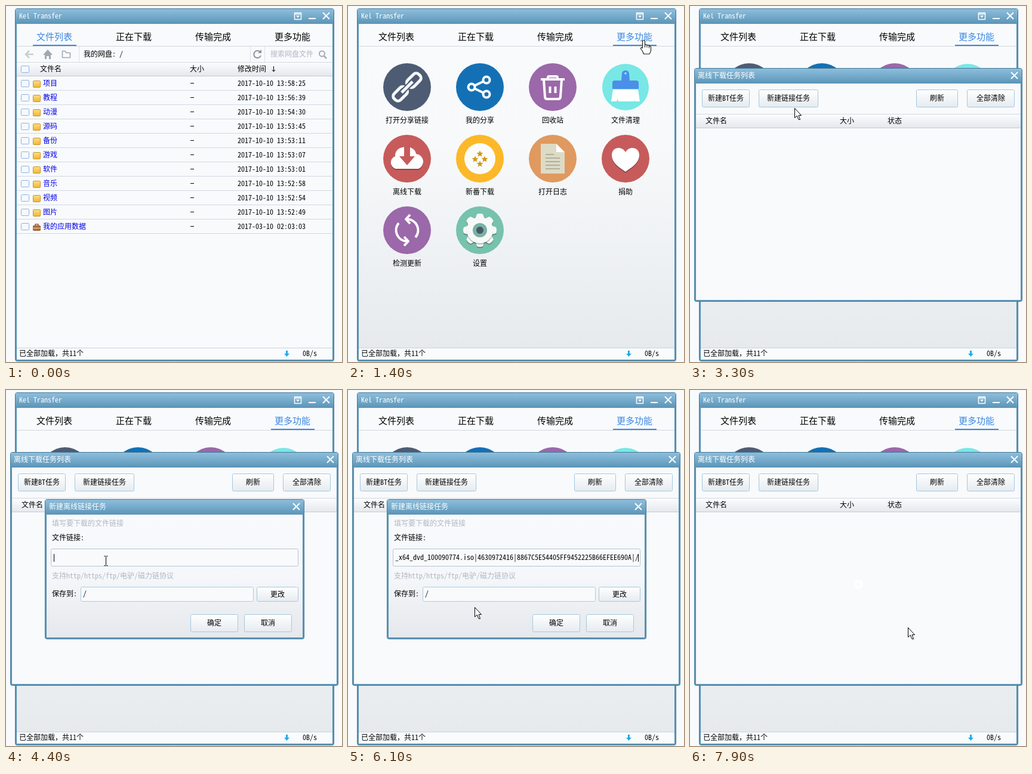
Animation, 563 px wide and 597 px high, one loop 8 s. Source, as an HTML page with a canvas:

```html
<!DOCTYPE html>
<html lang="zh-CN">
<head>
<meta charset="utf-8">
<title>Kel Transfer</title>
<style>
html, body { margin: 0; width: 100%; height: 100%; overflow: hidden; background: #f8fafc; }
canvas { display: block; }
</style>
</head>
<body>
<canvas id="stage" width="563" height="597"></canvas>
<script>
const c = document.getElementById('stage').getContext('2d');
const FONT = '"Noto Sans Mono CJK SC", "Noto Sans CJK SC", "Noto Sans CJK JP", monospace';
const BLUE = '#3b87e0', RED = '#c75b5b', PURPLE = '#9b68a9', PAPER = '#f8fafc', LINE = '#d3d9df';

// --- drawing helpers ---
function rect(x, y, w, h, fill) { c.fillStyle = fill; c.fillRect(x, y, w, h); }
function text(s, x, y, color = '#000', size = 12, align = 'left') {
  c.font = `${size}px ${FONT}`;
  c.textAlign = align;
  c.fillStyle = color;
  c.fillText(s, x, y + Math.round(size * .36));
}
function fade(y0, y1, ...colors) {
  const g = c.createLinearGradient(0, y0, 0, y1);
  colors.forEach((color, i) => g.addColorStop(i / (colors.length - 1), color));
  return g;
}
function path(d, fill, stroke, width = 1) {
  const p = new Path2D(d);
  if (fill) { c.fillStyle = fill; c.fill(p); }
  if (stroke) { c.strokeStyle = stroke; c.lineWidth = width; c.stroke(p); }
}
function disc(x, y, r, fill, stroke, width) {
  path(`M${x - r} ${y}a${r} ${r} 0 1 0 ${2 * r} 0a${r} ${r} 0 1 0 ${-2 * r} 0Z`, fill, stroke, width);
}
function box(x, y, w, h, fill, stroke, r = 2) {
  c.beginPath();
  c.roundRect(x + .5, y + .5, w - 1, h - 1, r);
  c.fillStyle = fill; c.fill();
  c.strokeStyle = stroke; c.lineWidth = 1; c.stroke();
}
function at(x, y, draw, angle = 0) {
  c.save();
  c.translate(x, y);
  c.rotate(angle);
  draw();
  c.restore();
}
function shadow(draw) {
  c.save();
  c.shadowColor = '#0004';
  c.shadowOffsetY = 2;
  draw();
  c.restore();
}

// --- widgets ---
function frame(x, y, w, h, title, titleX, body) {
  box(x, y, w, h, '#6ca2c2', '#3f7796', 3);
  rect(x + 1, y + 1, w - 2, 25, fade(y, y + 26, '#90bfdc', '#76abcb', '#5a94b7'));
  rect(x + 2, y + 26, w - 4, h - 28, '#4d89ab');
  rect(x + 3, y + 26, w - 6, h - 29, body);
  text(title, titleX, y + 13, '#fff');
  path(`M${x + w - 19} ${y + 7}l11 11m0-11l-11 11`, null, '#fff', 2);
}
function button(label, x, y, w, h, hot) {
  box(x, y, w, h, fade(y, y + h, '#fff', hot ? '#d4e8f6' : '#e5ebf0'), hot ? '#6fa9d0' : '#a6c8dd');
  text(label, x + w / 2, y + h / 2, '#000', 12, 'center');
}
function checkbox(x, y) { box(x, y, 14, 12, '#f5f9fd', '#8db4e2', 1); }
function listHeader(x, y, w, h) {
  rect(x, y, w, h, fade(y, y + h, '#fbfcfe', '#e4e7ed'));
  rect(x, y + h - 1, w, 1, '#c4cbd3');
}
const inside = (p, x, y, w, h) => p.x >= x && p.x < x + w && p.y >= y && p.y < y + h;

// --- file list ---
const files = [['项目', '58:25'], ['教程', '56:39'], ['动漫', '54:30'], ['源码', '53:45'], ['备份', '53:11'],
  ['游戏', '53:07'], ['软件', '53:01'], ['音乐', '52:58'], ['视频', '52:54'], ['图片', '52:49']]
  .map(([name, time]) => [name, '2017-10-10 13:' + time]);
files.push(['我的应用数据', '2017-03-10 02:03:03']);

function fileList(p) {
  path('M46 81H33m6-6l-6 6l6 6', null, '#c9cdd2', 2.5);
  path('M62 82L70 73L78 82H75V89H72V84H68V89H65V82Z', '#a0a8b1');
  path('M94.5 76.5V86.5H107.5V78.5H101L99 75.5H94.5Z', null, '#a0a8b1', 1.6);
  for (const x of [122, 409, 433]) rect(x, 68, 1, 27, '#dde2e7');
  text('我的网盘: /', 130, 81);
  path('M426.5 78A6 6 0 1 0 427 83', null, '#8b939c', 2);
  path('M428 73V79H422Z', '#8b939c');
  text('搜索网盘文件', 443, 81, '#b1b8c6');
  disc(529.5, 80, 4.5, null, '#a4abb3', 2);
  path('M533 84l4 4', null, '#a4abb3', 2.5);

  rect(18, 94, 529, 1, LINE);
  listHeader(18, 95, 529, 23);
  checkbox(25, 100);
  text('文件名', 57, 106);
  text('大小', 308, 106);
  text('修改时间', 388, 106);
  path('M448.5 101V110m-2.5-3l2.5 3l2.5-3', null, '#000');

  files.forEach(([name, date], i) => {
    const y = 130 + 24 * i;
    if (inside(p, 18, y - 12, 529, 24)) rect(18, y - 12, 529, 23, '#e4eff9');
    rect(18, y + 11, 529, 1, LINE);
    checkbox(25, y - 6);
    if (i < 10) {
      box(45, y - 5, 13, 12, fade(y - 5, y + 7, '#ffe083', '#f2b42e'), '#c9922c', 1);
    } else {
      path(`M49 ${y - 1}v-3h5v3`, null, '#8a5a34', 1.5);
      box(45, y - 2, 13, 9, '#b9713f', '#8a5a34', 1);
      rect(45, y + 2, 13, 1, '#ecd09a');
    }
    text(name, 62, y, '#0000e6');
    rect(309, y - 1, 6, 1, '#000');
    text(date, 388, y);
  });
}

// --- feature tiles, each icon drawn around its centre ---
const tiles = [
  ['打开分享链接', '#4e5c73', () => at(0, 0, () => {
    for (const x of [-29, 3]) {
      c.beginPath();
      c.roundRect(x, -7.5, 26, 15, 6);
      c.strokeStyle = '#f5f7fa'; c.lineWidth = 5; c.stroke();
    }
    path('M-13 0H13', null, '#4e5c73', 9);
    path('M-13 0H13', null, '#f5f7fa', 5);
  }, -Math.PI / 4)],
  ['我的分享', '#1470b5', () => {
    path('M11 -12L-14 0L11 12', null, '#fff', 4);
    for (const [x, y] of [[-14, 0], [11, -12], [11, 12]]) disc(x, y, 5.5, '#1470b5', '#fff', 4);
  }],
  ['回收站', PURPLE, () => {
    path('M-20 -13H20M-8 -13V-16Q-8 -18 -6 -18H6Q8 -18 8 -16V-13M-15 -13L-13 16Q-13 20 -9 20H9Q13 20 13 16L15 -13M-4.500 -1V10M4.500 -1V10', null, '#fff', 4);
  }],
  ['文件清理', '#77e8e5', () => {
    path('M-7 -11L-6 -23Q-5 -28 0 -28T6 -23L7 -11H18Q22 -11 22 -7V3H-22V-7Q-22 -11 -18 -11Z', '#4c8ee9');
    disc(0, -23, 2, '#77e8e5');
    path('M-21 4H21L24 24H16L15 20V24H-12L-13 20L-15 24H-24Z', '#fff');
  }],
  ['离线下载', RED, () => {
    shadow(() => path('M-19 17A11 11 0 0 1 -20 -4A14 14 0 0 1 -7 -19Q0 -23 7 -18Q14 -15 15 -8A13 13 0 0 1 19 17Z', '#fff'));
    path('M-5 -22H5V-4H13L0 11L-13 -4H-5Z', RED);
  }],
  ['新番下载', '#fcb828', () => {
    disc(0, 0, 26, '#fbfbfa');
    for (const [x, y] of [[0, -8], [-8, 1], [8, 1], [0, 9]]) at(x, y, () => {
      let d = '';
      for (let i = 0; i < 10; i++) {
        const a = i * Math.PI / 5, r = i % 2 ? 2.6 : 5.8;
        d += `${i ? 'L' : 'M'}${r * Math.sin(a)} ${-r * Math.cos(a)}`;
      }
      path(d + 'Z', '#cf981c');
    });
  }],
  ['打开日志', '#e0995f', () => {
    path('M-20 -25H6L20 -11V25H-20Z', '#dddbc6');
    path('M6 -25L20 -11H6Z', '#fff');
    for (let y = -8; y < 18; y += 6) rect(-12, y, y < -2 ? 14 : 24, 2, '#b2b09c');
  }],
  ['捐助', RED, () => {
    shadow(() => path('M0 22C-6 17 -23 9 -23 -6C-23 -20 -6 -22 0 -11C6 -22 23 -20 23 -6C23 9 6 17 0 22Z', '#fff'));
  }],
  ['检测更新', PURPLE, () => {
    for (const a of [0, Math.PI]) at(0, 0, () =>
      path('M14 12A18.500 18.500 0 0 0 0 -18.500M5 -26L-2 -18.500L5 -11', null, '#fff', 4), a);
  }],
  ['设置', '#77c2ad', () => {
    shadow(() => {
      for (let i = 0; i < 8; i++) at(0, 0, () => path('M-8 -18L-5 -27Q0 -29 5 -27L8 -18Z', '#f7f9f8'), i * Math.PI / 4);
      disc(0, 0, 22, '#f7f9f8');
    });
    disc(0, 0, 12, '#77b3a4');
    disc(0, 0, 6, '#4a5866');
  }],
];

function features(p, pressed) {
  rect(18, 68, 529, 505, fade(68, 573, PAPER, '#f7f9fa', '#eff2f4', '#e6eaed'));
  tiles.forEach(([label, color, icon], i) => {
    const x = 38 + i % 4 * 122, y = 88 + (i >> 2) * 120;
    if (inside(p, x, y, 122, 120)) {
      const shades = ['#fdfeff', '#dfe4e9'];
      if (pressed) shades.reverse();
      box(x, y, 122, 120, fade(y, y + 120, ...shades), '#a9c6da');
    }
    at(x + 61, y + 48, () => { disc(0, 0, i === 3 ? 39 : 40, color); icon(); });
    text(label, x + 61, y + 104, '#000', 12, 'center');
  });
}

function mainWindow(t, p) {
  const more = t >= 1400;
  frame(15, 4, 535, 592, 'Kel Transfer', 22, PAPER);
  path('M483.5 11.5h11v11h-11zM483 13.5h12', null, '#fff', 1.5);
  path('M486 16h6l-3 4z', '#fff');
  rect(507, 20, 12, 2, '#fff');
  if (more) features(p, t >= 2400); else fileList(p);
  ['文件列表', '正在下载', '传输完成', '更多功能'].forEach((label, i) => {
    const x = 81 + 133 * i, active = i === (more ? 3 : 0);
    const hot = inside(p, x - 37, 38, 74, 29);
    text(label, x, 52, active || hot ? BLUE : '#000', 15, 'center');
    if (active) rect(x - 36, 65, 73, 2, BLUE);
  });
  rect(18, 67, 529, 1, LINE);
  rect(18, 573, 529, 20, '#f9fbfd');
  rect(18, 573, 529, 1, '#cbd2d9');
  text('已全部加载，共11个', 22, 583);
  path('M469 578h3v5h3l-4.500 5l-4.500 -5h3z', '#1eaaf0');
  text('0B/s', 497, 583);
}

function taskWindow(t, p) {
  frame(7, 104, 550, 392, '离线下载任务列表', 13, PAPER);
  button('新建BT任务', 20, 140, 80, 30);
  button('新建链接任务', 115, 140, 100, 30, inside(p, 115, 140, 100, 30));
  button('刷新', 379, 140, 70, 30);
  button('全部清除', 464, 140, 80, 30);
  rect(10, 181, 544, 1, LINE);
  listHeader(10, 182, 544, 23);
  text('文件名', 26, 193);
  text('大小', 251, 193);
  text('状态', 331, 193);
  if (t >= 7300) at(282, 326, () => {
    disc(0, 0, 5.5, null, '#fdfeff', 4);
    path('M0 -5.5A5.5 5.5 0 1 1 -5.5 0', null, '#fff', 5);
  }, t / 100 * Math.PI / 4);
}

function linkDialog(t, p) {
  frame(65, 183, 435, 235, '新建离线链接任务', 72, fade(209, 415, PAPER, '#f5f7fa', '#e5e8ec'));
  text('填写要下载的文件链接', 77, 224, '#b1b7c2');
  text('文件链接:', 77, 248);
  box(75, 266, 415, 30, PAPER, '#b5c6d2');
  const pasted = t >= 6100;
  if (pasted) text('_x64_dvd_100090774.iso|4630972416|8867C5E54405FF9452225B66EFEE690A|/', 79, 281);
  if (pasted || t < 4900) rect(pasted ? 486 : 80, 275, 1, 13, '#000');
  text('支持http/https/ftp/电驴/磁力链协议', 77, 312, '#b1b7c2');
  text('保存到:', 77, 342);
  box(125, 330, 290, 25, PAPER, '#a9cde4');
  text('/', 129, 342);
  button('更改', 420, 330, 70, 25);
  button('确定', 309, 376, 80, 30, inside(p, 309, 376, 80, 30));
  button('取消', 399, 376, 80, 30);
}

// '*' marks enabled entries, '-' a separator
const menu = ['撤消(U)', '-', '剪切(T)', '复制(C)', '*粘贴(P)', '删除(D)', '-', '全选(A)', '-',
  '*从右到左的读取顺序(R)', '*显示 Unicode 控制字符(S)', '*插入 Unicode 控制字符(I)', '-',
  '*打开输入法(O)', '*汉字重选(R)'];

function contextMenu(p) {
  box(168, 282, 235, 278, '#f2f2f2', '#b8b8b8', 0);
  let y = 286;
  for (const item of menu) {
    if (item === '-') { rect(196, y + 3, 203, 1, '#d0d0d0'); y += 7; continue; }
    const enabled = item[0] === '*';
    if (inside(p, 168, y, 235, 22)) rect(171, y, 229, 22, enabled ? '#91c9f7' : '#e6e6e6');
    text(item.replace('*', ''), 200, y + 11, enabled ? '#000' : '#8a8a8a');
    y += 22;
  }
  path('M391 431l4 4l-4 4', null, '#333');
}

// --- pointer: time, x, y ---
const AWAY = { x: -99, y: -99 };
const route = [[500, 400, 560], [1100, 495, 57], [1500, 495, 57], [1700, 400, 85], [2200, 107, 278], [2800, 107, 278],
  [3100, 137, 243], [3300, 175, 171], [3500, 182, 154], [3900, 182, 154], [4200, 166, 299], [4300, 166, 299],
  [4400, 167, 286], [4600, 167, 286], [4700, 167, 282], [4800, 167, 282], [5700, 210, 360], [5800, 212, 364],
  [6400, 212, 364], [7100, 365, 402], [7200, 365, 398], [8000, 365, 398]];

function pointerAt(t) {
  if (t < 500) return AWAY;
  const i = route.findIndex(k => k[0] > t);
  const [t0, x0, y0] = route[i - 1], [t1, x1, y1] = route[i];
  const k = (t - t0) / (t1 - t0);
  return { x: Math.round(x0 + (x1 - x0) * k), y: Math.round(y0 + (y1 - y0) * k) };
}
function pointer(t, { x, y }) {
  at(x + .5, y + .5, () => {
    if (t >= 1100 && t < 2500) {
      path('M-2 13V2Q-2 0 0 0T2 2V8Q4 6 5.500 8.500Q7.500 7 9 9.500Q12 9 12 12V17Q12 19 9.500 23H0Q-1 19 -5 14Q-5 11 -2 13ZM2 8V12M5.500 9V12M9 10V13', '#fff', '#222', 1.2);
    } else if (t >= 4400 && t < 4900) {
      path('M-3 -8H-1L0 -7L1 -8H3M0 -7V7M-3 8H-1L0 7L1 8H3', null, '#000');
    } else {
      path('M0 0V16L3.700 12.500L6.500 19H9L6.500 12H11Z', '#fff', '#000');
    }
  });
}

function draw(t) {
  const p = pointerAt(t), tasksOpen = t >= 2500, dialogOpen = t >= 3700 && t < 7300;
  rect(0, 0, 563, 597, '#f8fafc');
  c.lineJoin = 'round';
  mainWindow(t, tasksOpen ? AWAY : p);
  if (tasksOpen) taskWindow(t, dialogOpen ? AWAY : p);
  if (dialogOpen) linkDialog(t, p);
  if (t >= 4900 && t < 6100) contextMenu(p);
  pointer(t, p);
}

let shown = -1;
function tick() {
  const t = Math.floor(performance.now() % 8000 / 100) * 100;
  if (t !== shown) draw(shown = t);
  requestAnimationFrame(tick);
}
tick();
</script>
</body>
</html>
```
